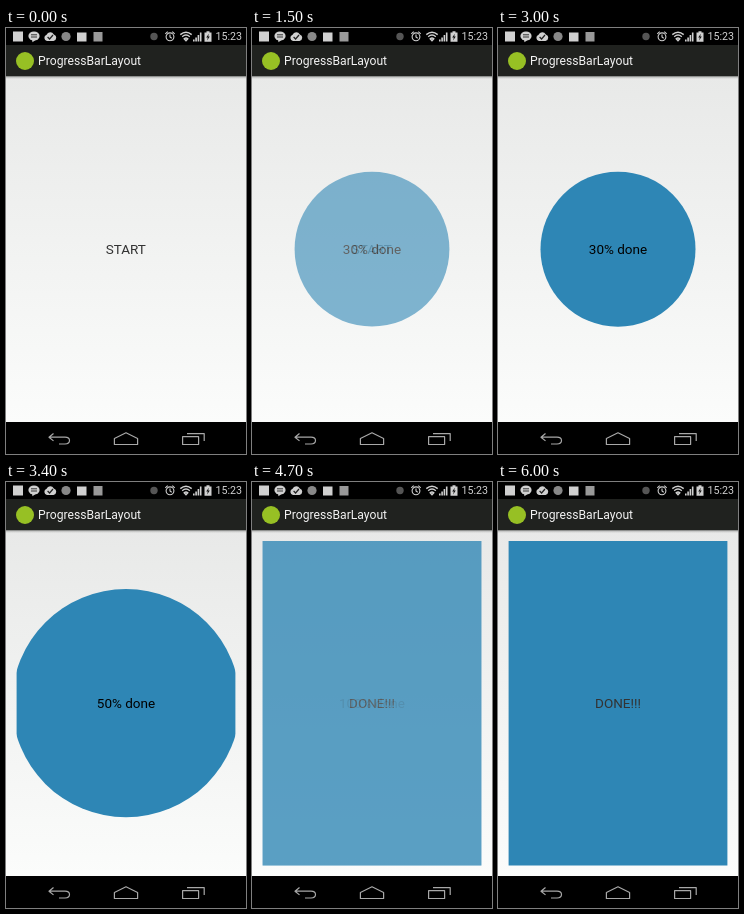
Recreate the animation shown at these times as an HTML page. Size 240 px wide and 426 px high, loop 6.5 s.

```html
<!DOCTYPE html>
<html lang="en">
<head>
<meta charset="utf-8">
<title>Progress layout</title>
<style>
  html, body { margin: 0; width: 100%; height: 100%; overflow: hidden; background: #000; }
  svg { display: block; width: 100vw; height: 100vh; font-family: Roboto, sans-serif; }
  .label { font-size: 13.5px; text-anchor: middle; }
  .line { fill: none; stroke: #a8a8a8; stroke-width: 1.2; stroke-linejoin: round; }
  .icon { fill: none; stroke: #d0d0d0; stroke-width: 1.1; }
</style>
</head>
<body>
<svg viewBox="0 0 240 426">
  <defs>
    <linearGradient id="page" x1="0" y1="0" x2="0" y2="1">
      <stop offset="0" stop-color="#e8e9e8"/>
      <stop offset="1" stop-color="#fbfcfb"/>
    </linearGradient>
    <linearGradient id="shadow" x1="0" y1="0" x2="0" y2="1">
      <stop offset="0" stop-opacity=".25"/>
      <stop offset="1" stop-opacity="0"/>
    </linearGradient>
    <clipPath id="panel"><rect x="10.6" y="59" width="218.8" height="324.5"/></clipPath>
  </defs>

  <rect width="240" height="426"/>
  <rect y="48" width="240" height="346" fill="url(#page)"/>
  <rect y="17" width="240" height="31.3" fill="#20221f"/>
  <rect y="48.3" width="240" height="2.7" fill="url(#shadow)"/>
  <circle cx="19" cy="33" r="9" fill="#97c024"/>
  <text x="32.1" y="37.4" font-size="12.15" fill="#f3f3f3">ProgressBarLayout</text>

  <!-- Status bar -->
  <g fill="#d0d0d0">
    <rect x="7" y="3.5" width="10" height="10"/>
    <ellipse cx="28" cy="8" rx="5.6" ry="4.6"/>
    <path d="M26 11l.5 3.2 4-3z"/>
    <path d="M25 6.8h6M25 9h6" stroke="#222" stroke-width=".9"/>
    <path d="M41 13a3.2 3.2 0 0 1-.4-6.2a4 4 0 0 1 7.2-.4a3.4 3.4 0 0 1-.3 6.6z"/>
    <path d="M41.6 9l2 2 3.4-4" fill="none" stroke="#222" stroke-width="1.2"/>
    <circle cx="60" cy="8.5" r="4.6" fill="#888"/>
    <rect x="71" y="4.5" width="9.5" height="9"/>
    <rect x="87.5" y="4" width="9" height="9.5" fill="#999"/>
    <circle cx="148" cy="8.5" r="3.7" fill="#555"/>
    <path d="M187 13.5v-2h1.6v2zM189.3 13.5v-4h1.6v4zM191.6 13.5v-6.5h1.6v6.5zM193.9 13.5v-9h1.6v9z"/>
    <path d="M198.5 4.5h2v-1.3h3v1.3h2v9.2h-7z"/>
    <path d="M202.8 5.8l-2.6 3.6h1.6l-.7 3 2.7-3.8h-1.6z" fill="#111"/>
    <text x="209.5" y="12.4" font-size="10.67">15:23</text>
  </g>
  <g class="icon">
    <circle cx="164" cy="8.8" r="3.9"/>
    <path d="M164 6.4v2.6l1.7 1.2M159.3 5.8l2.4-2.2M168.7 5.8l-2.4-2.2"/>
    <path d="M174.3 6.6q5.7-4.8 11.4 0M176.2 8.7q3.8-3.2 7.6 0M178.2 10.8q1.8-1.6 3.6 0l-1.8 2z" stroke-width="1.4"/>
  </g>

  <!-- Navigation bar -->
  <g class="line">
    <path d="M47.5 405.5l-4.5 3.7 4.5 3.7M43 409.2h16q4.5 0 4.5 3.4t-4.5 3.4h-6"/>
    <path d="M120 404.8l11.6 5.7v6h-23.2v-6z"/>
    <path d="M176.6 408.7h16v7.8h-16zM181 405.6h17.2v7.4"/>
  </g>

  <g id="idle"><text class="label" x="119.8" y="226.2" fill="#333">START</text></g>
  <g id="loading">
    <circle id="disc" cx="120" cy="221.2" fill="#2e86b5" clip-path="url(#panel)"/>
    <text id="percent" class="label" x="120" y="226.1"></text>
  </g>
  <g id="done">
    <rect x="10.6" y="59" width="218.8" height="324.5" fill="#2e86b5"/>
    <text class="label" x="120" y="226.2" fill="#333">DONE!!!</text>
  </g>
</svg>
<script>
  const LOOP = 6500, STEP = 100;
  const START_RADIUS = 77.4, FULL_RADIUS = 202;
  const [idle, loading, done, disc, percent] =
    ['idle', 'loading', 'done', 'disc', 'percent'].map(id => document.getElementById(id));

  // Accelerate-decelerate progress of a span
  const ease = (time, start, duration) => {
    const x = Math.min(1, Math.max(0, (time - start) / duration));
    return (1 - Math.cos(Math.PI * x)) / 2;
  };
  const mix = (a, b, k) => a + (b - a) * k;

  function draw() {
    const time = Math.floor(performance.now() % LOOP / STEP) * STEP;
    const begin = ease(time, 830, 1200);
    const grow = ease(time, 2980, 1150);
    const finish = ease(time, 4000, 1150);

    idle.setAttribute('opacity', 1 - begin);
    loading.setAttribute('opacity', begin * (1 - finish));
    done.setAttribute('opacity', finish);
    disc.setAttribute('r', mix(START_RADIUS, FULL_RADIUS, grow));
    percent.textContent = Math.floor(mix(30, 100, grow)) + '% done';
    requestAnimationFrame(draw);
  }
  draw();
</script>
</body>
</html>
```
